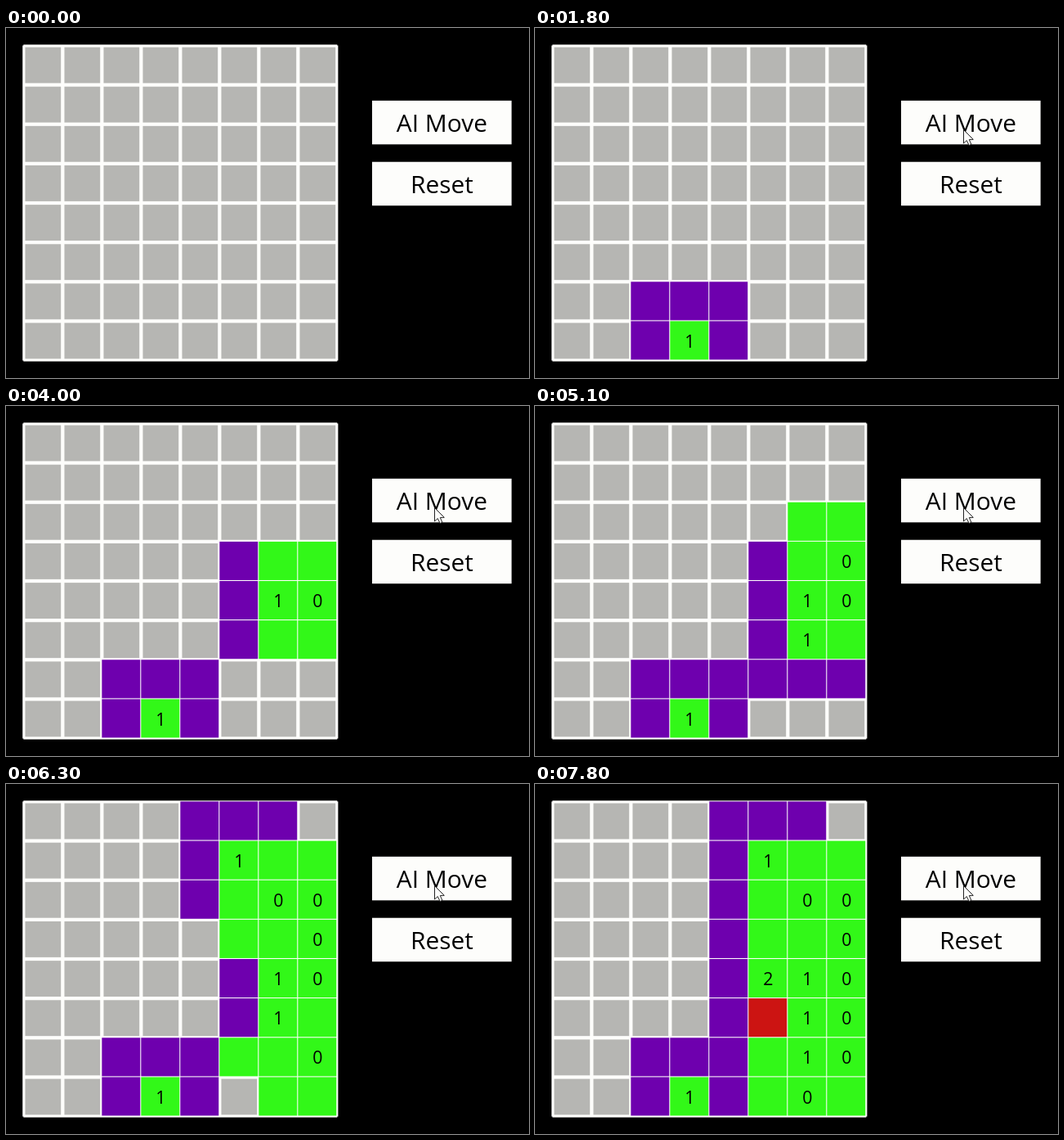
Animation of 640 by 428 pixels, one loop 8 s. Source, as an HTML page with a canvas:

```html
<!DOCTYPE html>
<html lang="en">
<head>
<meta charset="utf-8">
<title>Minesweeper solver</title>
<style>
html, body { margin: 0; width: 100%; height: 100%; overflow: hidden; background: #000; }
canvas { display: block; }
</style>
</head>
<body>
<canvas id="stage" width="640" height="428"></canvas>
<script>
const ctx = document.getElementById('stage').getContext('2d');
const LOOP = 8000;
const W = 600, H = 400; // the window's own layout size, scaled to the stage
const CELL = 45, ORIGIN = 20, SIZE = 8;
const WHITE = '#fdfdfb', GRAY = '#b6b6b3';
const SAFE = '#32f818', UNSURE = '#6e00ae', MINE = '#cc1412';

// Each move: time, opened cell (row and column), its count, then newly coloured cells.
const moves = [
  { t: 1800, open: '73', n: 1, unsure: '62 63 64 72 74' },
  { t: 2900, open: '47', n: 0, safe: '36 37 46 56 57' },
  { t: 4000, open: '46', n: 1, unsure: '35 45 55' },
  { t: 4600, open: '56', n: 1, unsure: '65 66 67' },
  { t: 4900, open: '37', n: 0, safe: '26 27' },
  { t: 5400, open: '27', n: 0, safe: '16 17' },
  { t: 5600, open: '26', n: 0, safe: '15 25 35' },
  { t: 6000, open: '15', n: 1, unsure: '04 05 06 14 24', safe: '65 66 67' },
  { t: 6300, open: '67', n: 0, safe: '76 77' },
  { t: 6500, open: '66', n: 1 },
  { t: 6700, open: '76', n: 0, safe: '75', mine: '55' },
  { t: 7200, open: '57', n: 0, safe: '45' },
  { t: 7300, open: '45', n: 2, unsure: '34 44 54' }
];

function boardAt(t) {
  const color = {}, count = {};
  const paint = (cells, c) => cells && cells.split(' ').forEach(k => color[k] = c);
  for (const m of moves) {
    if (t < m.t) break;
    paint(m.open, SAFE);
    paint(m.unsure, UNSURE);
    paint(m.safe, SAFE);
    paint(m.mine, MINE);
    count[m.open] = m.n;
  }
  return { color, count };
}

function box(x, y, w, h, fill) {
  ctx.fillStyle = fill;
  ctx.fillRect(x, y, w, h);
}

function label(text, x, baseline, size) {
  ctx.font = size + 'px "Open Sans", sans-serif';
  ctx.textAlign = 'center';
  ctx.fillStyle = '#000';
  ctx.fillText(text, x, baseline);
}

function drawBoard(t) {
  const { color, count } = boardAt(t);
  const side = SIZE * CELL + 2;
  box(ORIGIN - 1, ORIGIN, side, side - 2, WHITE);
  box(ORIGIN, ORIGIN - 1, side - 2, side, WHITE);
  for (let r = 0; r < SIZE; r++) {
    for (let c = 0; c < SIZE; c++) {
      const key = '' + r + c;
      const x = ORIGIN + c * CELL, y = ORIGIN + r * CELL;
      if (color[key]) box(x, y, CELL - 1, CELL - 1, color[key]);
      else box(x + 2, y + 2, CELL - 4, CELL - 4, GRAY);
      if (key in count) label(count[key], x + 22.5, y + 30, 20);
    }
  }
}

function drawButton(text, y) {
  box(420, y, 160, 50, WHITE);
  label(text, 500, y + 36, 28);
}

function cursorAt(t) {
  if (t < 900) return null;
  if (t >= 1800) return [524, 124];
  const p = Math.min(1, (Math.floor(t / 100) * 100 - 900) / 400);
  const rest = (1 - p) ** 2;
  return [523 + 40 * rest, 128 + 130 * rest];
}

function drawCursor([x, y]) {
  const shape = [[0, 0], [0, 16.5], [3.8, 13], [6.6, 19], [9.4, 17.8], [6.8, 12], [11.8, 11.8]];
  ctx.beginPath();
  shape.forEach(([dx, dy]) => ctx.lineTo(x + 0.5 + dx, y + 0.5 + dy));
  ctx.closePath();
  ctx.fillStyle = WHITE;
  ctx.fill();
  ctx.strokeStyle = '#222';
  ctx.lineWidth = 1;
  ctx.stroke();
}

function draw(t) {
  ctx.setTransform(1, 0, 0, 1, 0, 0);
  box(0, 0, 640, 428, '#000');
  ctx.scale(640 / W, 428 / H);
  drawBoard(t);
  drawButton('AI Move', 83);
  drawButton('Reset', 153);
  ctx.setTransform(1, 0, 0, 1, 0, 0);
  const cursor = cursorAt(t);
  if (cursor) drawCursor(cursor);
}

const start = performance.now();
function tick() {
  draw((performance.now() - start) % LOOP);
  requestAnimationFrame(tick);
}
tick();
</script>
</body>
</html>
```
